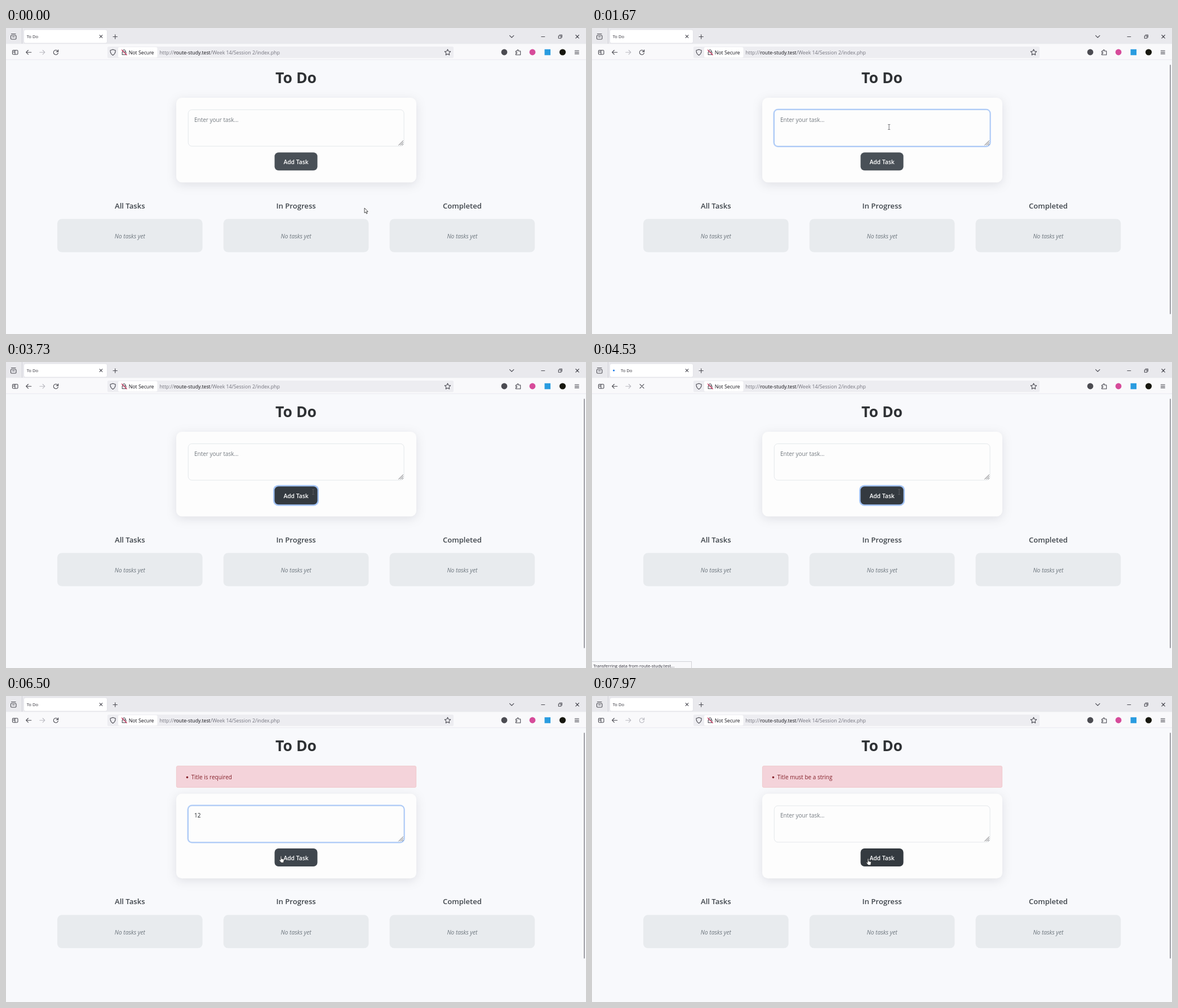
Write an HTML page that moves like this. It is 1029x544 px and loops after 8 s.

```html
<!DOCTYPE html>
<html lang="en">
<head>
<meta charset="utf-8">
<title>To Do</title>
<style>
  html, body { margin: 0; width: 100%; height: 100%; overflow: hidden; background: #f8f9fc; }
  svg { display: block; width: 100%; height: 100%; font: 10px "Open Sans", "Noto Sans", sans-serif; }
  text { white-space: pre; }
  .mid { text-anchor: middle; }
  .head { font-size: 13.1px; font-weight: 600; fill: #3f454b; }
  .empty { font-size: 10.2px; font-style: italic; fill: #6c757d; }
  .chrome { font-size: 8.75px; fill: #15141a; }
  .small { font-size: 7.6px; fill: #2b2a33; }
  .icon { fill: none; stroke: #4a4a52; stroke-width: 1.1; stroke-linecap: round; stroke-linejoin: round; }
  .card { filter: drop-shadow(0 4px 9px rgba(0, 0, 20, .1)); }
</style>
</head>
<body>
<svg viewBox="0 0 1029 544" preserveAspectRatio="none">
  <rect width="1029" height="544" fill="#f8f9fc"/>

  <!-- tab strip -->
  <rect width="1029" height="28.5" fill="#e9e9ed"/>
  <path d="M28.5 0V28" stroke="#d2d2d8"/>
  <rect x="31.5" y="3" width="148" height="24" rx="3" fill="#fff" stroke="#dcdce2" stroke-width=".7"/>
  <circle id="dot" cy="15" r="1.6" fill="#1779e8"/>
  <text id="tab" class="small" y="18">To Do</text>
  <g class="icon">
    <rect x="8.5" y="13" width="9.5" height="7" rx="1.5"/>
    <path d="M9.5 10.5H17M11.5 15.8H15"/>
    <path d="M166.2 12.7l4.6 4.6m0-4.6l-4.6 4.6M190 15.5h7.4M193.7 11.8v7.4M893.5 13.3l3.7 3.7 3.7-3.7"/>
    <path d="M949.8 15.5h6M1010.8 12.5l5.6 5.6m0-5.6l-5.6 5.6"/>
    <path d="M980.3 14h4.4v4.2h-4.4zM981.8 12.3h4.5v4.3"/>
  </g>

  <!-- toolbar -->
  <rect y="28.5" width="1029" height="27.5" fill="#f9f9fb"/>
  <path d="M0 56.3H1029" stroke="#e6e6ec" stroke-width=".8"/>
  <rect x="180" y="33" width="614" height="20.5" rx="2.5" fill="#ededf1"/>
  <rect x="199" y="34" width="69.5" height="18.5" rx="2.5" fill="#fff"/>
  <g class="icon">
    <rect x="11.5" y="39.5" width="9.5" height="7.5" rx="1.5"/>
    <path d="M13.2 41.5h1.6M13.2 43.5h1.6M16 39.8v7"/>
    <path d="M44.8 43.2h-9M39.4 39.5l-3.7 3.7 3.7 3.7"/>
    <path d="M59.8 43.2h9M65.2 39.5l3.7 3.7-3.7 3.7" stroke="#b9b9c0"/>
    <path id="reload" d="M92.3 42a4.1 4.1 0 1 0 .1 2.4M92.7 38.7v3.4h-3.4"/>
    <path id="stop" d="M85 39.7l7 7m0-7l-7 7"/>
    <path d="M189.6 38.2l4.6 1.6c.1 4.2-1.4 7-4.6 8.7-3.2-1.7-4.7-4.5-4.6-8.7z"/>
    <path d="M206.2 42.5h6.6v5h-6.6zM207.4 42.3v-1.5a2.1 2.1 0 0 1 4.2 0v1.5"/>
    <path d="M205.2 38.8l9 9.2" stroke="#d42a58"/>
    <path d="M783.5 38l1.6 3.3 3.6.5-2.6 2.5.6 3.6-3.2-1.7-3.2 1.7.6-3.6-2.6-2.5 3.6-.5z"/>
    <path d="M904.5 41h2.4c-.9-2.8 3.3-2.8 2.4 0h3.4v6.7h-8.2v-2.2c2.7.8 2.7-2.9 0-2.1z"/>
    <path d="M1009.3 40.3h7M1009.3 43.1h7M1009.3 45.9h7"/>
  </g>
  <circle cx="884" cy="43" r="5.4" fill="#4c4c52"/>
  <circle cx="934" cy="43" r="5.4" fill="#d64b9a"/>
  <rect x="955.5" y="37.8" width="10.5" height="10.5" fill="#2a9ce0"/>
  <circle cx="987.5" cy="43" r="5.6" fill="#17170f"/>
  <text class="chrome" x="217.7" y="46.8">Not Secure</text>
  <text class="chrome" x="272.5" y="46.8"><tspan fill="#74747e">http://</tspan>route-study.test<tspan fill="#74747e">/Week 14/Session 2/index.php</tspan></text>

  <!-- page -->
  <text class="mid" x="514.5" y="97.5" font-size="26.5" font-weight="700" fill="#2e3134">To Do</text>
  <g id="alert">
    <rect x="302.4" y="124.4" width="425.2" height="38.2" rx="2.5" fill="#f4d3da" stroke="#efc3c4" stroke-width=".8"/>
    <circle cx="321.5" cy="144.6" r="1.8" fill="#842029"/>
    <text id="message" x="328.8" y="148" fill="#842029"></text>
  </g>
  <g id="main">
    <rect class="card" x="302" y="124" width="426" height="150.5" rx="10" fill="#fdfdfd"/>
    <rect id="fieldRing" x="321.4" y="143.4" width="386.4" height="68.6" rx="8.5" fill="#bfd6fb"/>
    <rect id="field" x="323.3" y="145.3" width="382.8" height="64.8" rx="6.5" fill="#fdfdfd" stroke-width=".8"/>
    <path d="M696.5 208.5l8.3-8.3M699.5 208.5l5.3-5.3M702.5 208.5l2.3-2.3" stroke="#55555b" stroke-width=".9"/>
    <text id="value" x="334" y="166.6"></text>
    <path id="caret" stroke="#212529" stroke-width=".9"/>
    <rect id="buttonRing" x="474" y="218.7" width="81" height="37" rx="9" fill="#a3c3f5"/>
    <rect id="button" x="476.5" y="221.2" width="76" height="32" rx="7"/>
    <text class="mid" x="514.5" y="242" font-size="10.3" font-weight="600" fill="#fff">Add Task</text>
    <g id="columns"></g>
  </g>
  <path id="scroll" stroke="#85858c" stroke-width="1.6" stroke-linecap="round"/>
  <g id="status">
    <rect x="-1" y="532.5" width="177.5" height="13" fill="#f9f9fb" stroke="#c9c9cf" stroke-width=".8"/>
    <text class="small" x="2.2" y="542.6">Transferring data from route-study.test...</text>
  </g>

  <!-- pointers, each with its hot spot at 0,0 -->
  <g id="arrow"><path d="M0 0V8.8l2-1.8 1.5 3.2 1.5-.7-1.5-3.1h2.7z" fill="#fff" stroke="#222" stroke-width=".8"/></g>
  <g id="beam"><path d="M-2-4.5h1.5L0-4 .5-4.5H2M0-4V4M-2 4.5h1.5L0 4l.5.5H2" fill="none" stroke="#5c5c60" stroke-width=".9"/></g>
  <g id="hand"><path d="M-1 0c0-1.3 1.8-1.3 1.8 0v3.7l3.3.8c1 .3 1.2 1 1 2L4.4 10.7H.2L-3 6.8c-.6-1 .5-1.7 1.3-1L-1 6.4z" fill="#fff" stroke="#222" stroke-width=".7"/></g>
</svg>
<script>
const LOOP = 8000;
const $ = id => document.getElementById(id);
const set = (id, attrs) => { for (const k in attrs) $(id).setAttribute(k, attrs[k]); };
const show = (id, on) => set(id, { visibility: on ? "visible" : "hidden" });
const within = (t, ...spans) => spans.some(([a, b]) => t >= a && t < b);
const clamp = v => Math.max(0, Math.min(1, v));

$("columns").innerHTML = ["All Tasks", "In Progress", "Completed"].map((name, i) => {
  const x = 91 + 294.8 * i, mid = x + 128.8;
  return `<text class="mid head" x="${mid}" y="320.5">${name}</text>
    <rect x="${x}" y="339.5" width="257.6" height="59" rx="8" fill="#e8ebee"/>
    <text class="mid empty" x="${mid}" y="373.8">No tasks yet</text>`;
}).join("");

// pointer path: time, x, y
const path = [
  [0, 636, 320], [30, 636, 320], [100, 609, 273], [500, 609, 273], [1150, 527, 176],
  [2500, 527, 176], [3060, 542, 203], [3150, 542, 203], [3480, 545, 231], [4650, 545, 231],
  [5100, 480, 221], [6200, 480, 221], [6480, 488, 285.5], [6750, 490, 290], [LOOP, 490, 290]
];

function pointerAt(t) {
  const i = path.findIndex(p => p[0] > t), [t0, x0, y0] = path[i - 1], [t1, x1, y1] = path[i];
  const u = (t - t0) / (t1 - t0), e = u * u * (3 - 2 * u);
  return [x0 + (x1 - x0) * e, y0 + (y1 - y0) * e];
}

function render(t) {
  const failed = t >= 4670, rejected = t >= 7700;
  const loading = within(t, [3850, 4670], [6950, 7700]);
  const focused = within(t, [950, 3650], [5500, 6780]);
  const pressed = within(t, [3650, 4670], [6780, 7700]);

  show("alert", failed);
  $("message").textContent = rejected ? "Title must be a string" : "Title is required";
  set("main", { transform: `translate(0 ${failed ? 49.8 : 0})` });
  show("scroll", t >= 520);
  set("scroll", { d: `M1026 66V${failed ? 466 : 508}` });

  // browser state
  show("dot", loading);
  show("status", loading);
  show("stop", loading);
  show("reload", !loading);
  set("reload", { stroke: within(t, [4670, 5100], [7700, LOOP]) ? "#b9b9c0" : "#4a4a52" });
  set("tab", { x: loading ? 51 : 36.7 });
  set("dot", { cx: 41.5 - 3.5 * Math.cos((t - 4430) / 1000 * 2 * Math.PI) });

  // form
  const typed = within(t, [5850, 7700]) ? "12".slice(0, t < 6030 ? 1 : 2) : "";
  $("value").textContent = typed || "Enter your task...";
  set("value", { fill: typed ? "#212529" : "#747a80" });
  show("fieldRing", focused);
  set("field", { stroke: focused ? "#86b0ee" : "#dee2e6" });
  show("caret", within(t, [950, 1350], [1850, 2350], [5500, 6450]));
  set("caret", { d: `M${334.8 + 5.72 * typed.length} 157v11.5` });

  const hover = t < 4670 ? clamp((t - 3400) / 200) : clamp((t - 6410) / 200);
  const shade = [[73, 52], [80, 58], [87, 64]].map(([a, b]) => Math.round(a + (b - a) * hover));
  set("button", { fill: `rgb(${shade})` });
  show("buttonRing", pressed);

  // pointer
  const kind = t < 950 ? "arrow" : t < 6410 ? "beam" : "hand";
  for (const id of ["arrow", "beam", "hand"]) show(id, id === kind);
  set(kind, { transform: `translate(${pointerAt(t)})` });
}

const start = performance.now();
function tick() {
  render((performance.now() - start) % LOOP);
  requestAnimationFrame(tick);
}
tick();
</script>
</body>
</html>
```
